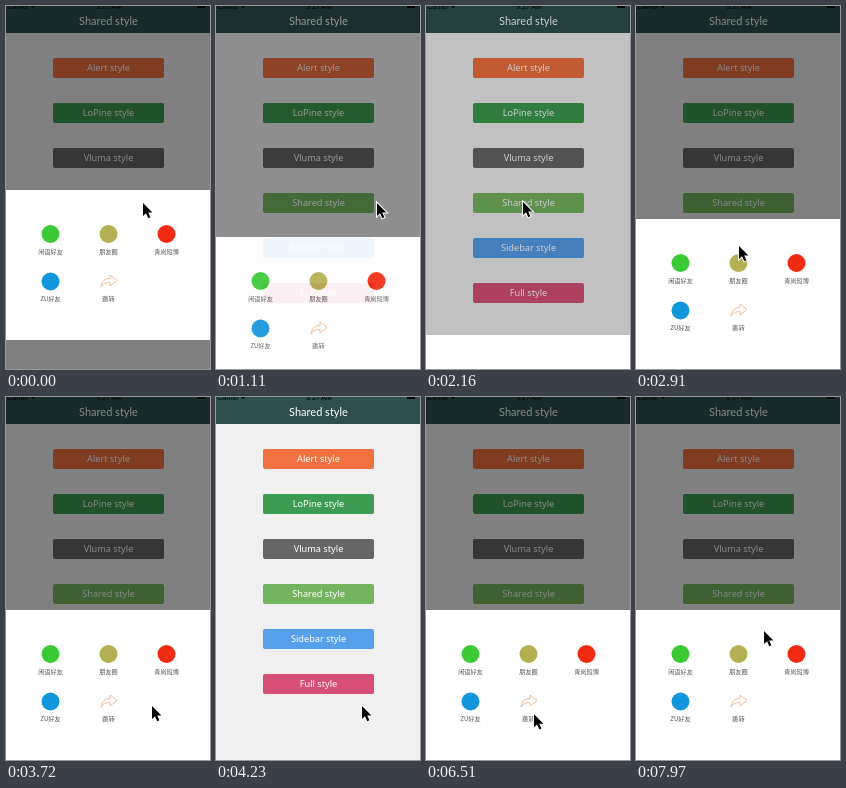
An HTML page that plays this animation: 204x363 px, repeating every 8 s.

```html
<!DOCTYPE html>
<html lang="en">
<head>
<meta charset="utf-8">
<title>Shared style</title>
<style>
  html, body { margin: 0; height: 100%; overflow: hidden; background: #f0f0f0; }
  svg { display: block; width: 204px; height: 363px; }
  text { text-anchor: middle; }
  .button { font: 9.2px "Noto Sans", sans-serif; fill: #fff; }
  .title { font: 11px Lato, sans-serif; fill: #fff; }
  .status { font: 7px "Liberation Sans", sans-serif; fill: #000; }
  .label { font: 6.2px "Noto Sans CJK SC", "Noto Sans CJK", sans-serif; fill: #555; }
</style>
</head>
<body>
<svg viewBox="0 0 204 363">
  <g id="content">
    <rect width="204" height="363" fill="#f0f0f0"/>
    <rect width="204" height="27" fill="#2f4f4f"/>
    <g class="status">
      <text x="12" y="2.5">Carrier</text>
      <text x="103" y="2.5">9:27 AM</text>
      <path d="M25 0h4l-2 2zM191 0h8v2h-8z"/>
    </g>
    <text class="title" x="102.5" y="19">Shared style</text>
  </g>
  <path id="shade"/>
  <g id="sheet">
    <rect width="204" height="150" fill="#fff"/>
    <path d="M95 97c1-6 4-8.5 9-8.5V85l7 5.5-7 5.5v-3.5c-4 0-6.500 1-9 4.500z" fill="none" stroke="#f3b58c" stroke-width=".9" stroke-linejoin="round"/>
  </g>
  <path id="cursor" d="M1 2v13l3-2.800 2.300 5 2.100-.9-2.200-4.800h4.200z" stroke="#fff" stroke-width="2" paint-order="stroke"/>
</svg>
<script>
const LOOP = 8000, CLOSED = 363, OPEN = 213, SHEET = 150;
const $ = id => document.getElementById(id);
const content = $('content'), shade = $('shade'), sheet = $('sheet'), cursor = $('cursor');

function add(parent, tag, attrs, text = '') {
  const node = document.createElementNS('http://www.w3.org/2000/svg', tag);
  for (const key in attrs) node.setAttribute(key, attrs[key]);
  node.textContent = text;
  parent.append(node);
}

const buttons = {
  Alert: '#f0703f', LoPine: '#3c9b50', Vluma: '#666',
  Shared: '#74b45f', Sidebar: '#569fea', Full: '#d74f76'
};
Object.entries(buttons).forEach(([name, fill], i) => {
  const y = 52 + 45 * i;
  add(content, 'rect', { x: 47, y, width: 111, height: 20, rx: 2, fill });
  add(content, 'text', { class: 'button', x: 102.5, y: y + 12.8 }, name + ' style');
});

const actions = {
  闲语好友: '#3bca35', 朋友圈: '#b3b052', 青岚短博: '#f12b12', ZU好友: '#1296db', 跳转: 'none'
};
Object.entries(actions).forEach(([name, fill], i) => {
  const x = 44.5 + 58 * (i % 3), y = 44 + 47.5 * Math.floor(i / 3);
  add(sheet, 'circle', { cx: x, cy: y, r: 9, fill });
  add(sheet, 'text', { class: 'label', x, y: y + 19.5 }, name);
});

const clamp = v => Math.max(0, Math.min(1, v));
const ease = v => v * v * (3 - 2 * v);

// Underdamped spring from 0 to 1
function spring(t) {
  const w = 0.0155, decay = 0.00718;
  return 1 - Math.exp(-decay * t) * (Math.cos(w * t) + decay / w * Math.sin(w * t));
}

// The sheet alternately opens and closes at these times, visibly after LAG
const toggles = [-170, 1041, 2116, 3875, 5326], LAG = 40;

// Pointer moves: start time, x, y; each lasts MOVE
const MOVE = 600;
const moves = [
  [60, 160, 195], [1150, 96, 194], [2250, 102, 238], [3110, 145, 307],
  [4470, 113, 197], [5480, 112, 245], [6070, 106, 330], [6970, 127, 232]
];

function pointer(t) {
  let x = 136, y = 195;
  for (const [start, toX, toY] of moves) {
    const k = ease(clamp((t - start) / MOVE));
    x += (toX - x) * k;
    y += (toY - y) * k;
  }
  return [x, y];
}

function draw(t) {
  const index = toggles.findLastIndex(start => start + LAG <= t);
  const opening = index % 2 === 0, elapsed = t - toggles[index];
  const shown = opening ? spring(elapsed) : 1 - ease(clamp(elapsed / 320));
  const top = Math.round(CLOSED + (OPEN - CLOSED) * shown);

  // The shade leaves out the area behind the sheet
  shade.setAttribute('d', `M0 0h204v${top}H0zM0 ${top + SHEET}h204v${CLOSED}H0z`);
  shade.setAttribute('opacity', 0.47 * (opening ? clamp(shown ** 0.6) : shown));
  sheet.setAttribute('transform', `translate(0 ${top})`);
  sheet.setAttribute('opacity', opening ? 1 : 0.3 + 0.7 * shown);
  cursor.setAttribute('transform', `translate(${pointer(t)})`);
}

function tick() {
  draw(performance.now() % LOOP);
  requestAnimationFrame(tick);
}
tick();
</script>
</body>
</html>
```
